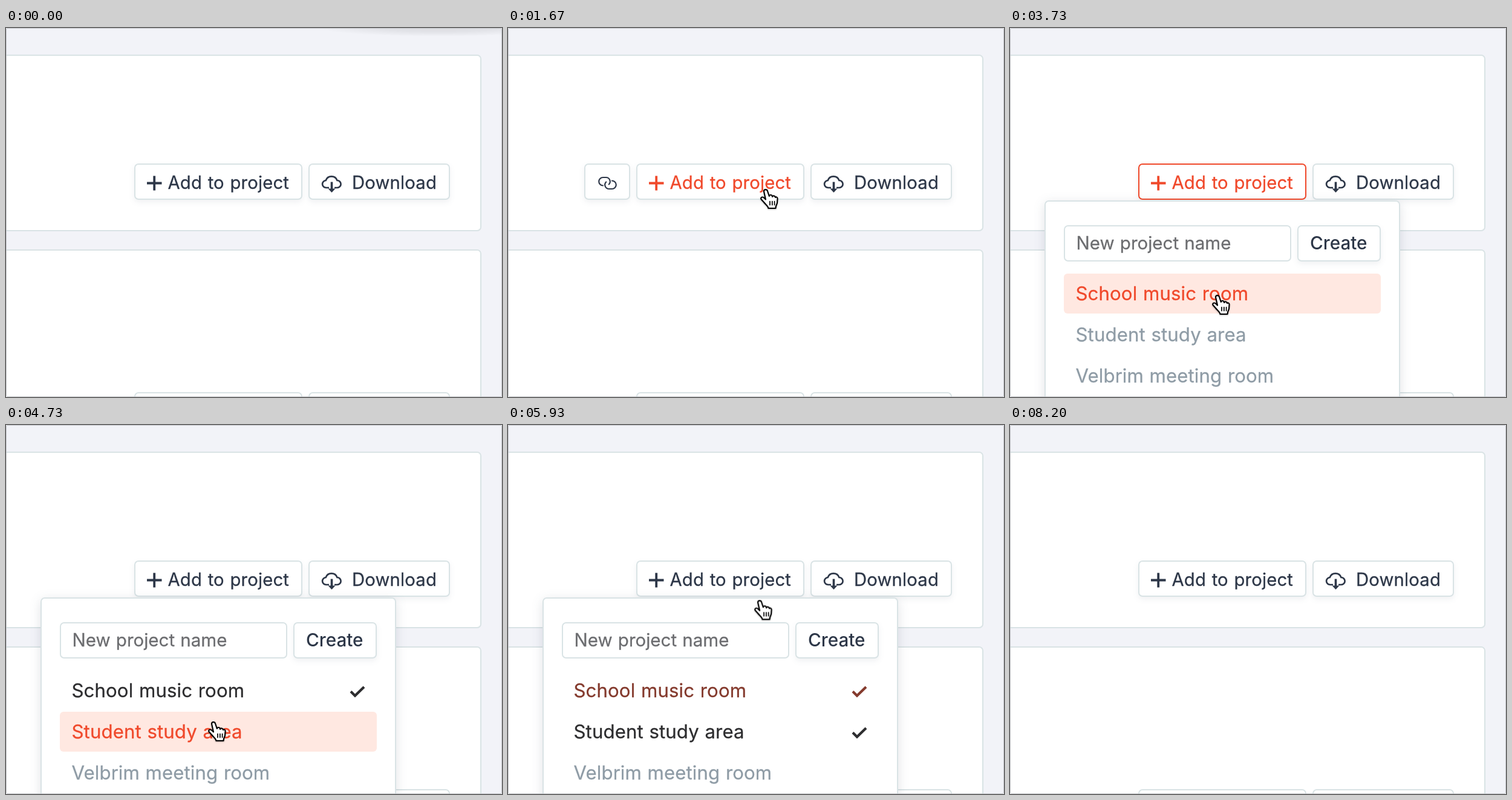
An HTML page that plays this animation: 820x610 px, repeating every 8990 ms.

```html
<!DOCTYPE html>
<html lang="en">
<head>
<meta charset="utf-8">
<title>Add to project</title>
<style>
:root {
  --ink: #2d3748;
  --red: #f0492b;
  --done: #2d2d2f;
  --muted: #8f9ca6;
  --line: #d9e3e5;
}
html, body { margin: 0; width: 820px; height: 610px; overflow: hidden; background: #f2f3f8; }
svg { display: block; }
text {
  font: 400 29.25px Inter, "Noto Sans", sans-serif;
  font-optical-sizing: none;
  letter-spacing: .18px;
  word-spacing: 1.2px;
  fill: currentColor;
  stroke: currentColor;
  stroke-width: .3;
}
.field { font-size: 29.5px; letter-spacing: 0; word-spacing: 1px; color: #6c6d70; }
.create { font-size: 29.7px; font-weight: 500; letter-spacing: 0; stroke: none; }
.row text { font-size: 31.2px; letter-spacing: .1px; word-spacing: .8px; }
.tip text { letter-spacing: .05px; }
.box { fill: #fff; stroke: var(--line); stroke-width: 2; }
.raised { filter: drop-shadow(0 4px 5px rgba(40, 60, 80, .07)); }
.icon { fill: none; stroke: currentColor; }
.ink { color: var(--ink); }
.muted { color: var(--muted); }
.hot { fill: #ffe8e1; }

/* every part shares one loop; .step parts switch without easing */
.anim { animation: 8990ms linear infinite both; }
.step { animation-timing-function: step-end; }

.haze { animation-name: haze; }
@keyframes haze { 0%, .7% { opacity: 1 } 3%, 100% { opacity: 0 } }

.link { animation-name: link; }
@keyframes link { 0% { opacity: 0 } 13.8% { opacity: 1 } 29.7%, 100% { opacity: 0 } }

.add { animation-name: add; }
@keyframes add {
  0%, 15.7% { color: var(--ink) }
  17%, 44.8% { color: var(--red) }
  46.3%, 66% { color: var(--ink) }
  67.2%, 74.8% { color: var(--red) }
  80%, 100% { color: var(--ink) }
}
.add-box { animation-name: add-box; }
@keyframes add-box {
  0%, 29.4% { stroke: var(--line) }
  30.4%, 44.8% { stroke: var(--red) }
  46.3%, 66.6% { stroke: var(--line) }
  67.4%, 74.8% { stroke: var(--red) }
  80%, 100% { stroke: var(--line) }
}
.download { animation-name: download; }
@keyframes download {
  0%, 68.8% { color: var(--ink) }
  69.8%, 70.4% { color: var(--red) }
  71.34%, 100% { color: var(--ink) }
}

.popup { animation-name: popup; }
@keyframes popup {
  0%, 29.4% { opacity: 0 }
  31%, 66.7% { opacity: 1 }
  67.6%, 100% { opacity: 0 }
}
.row1 { animation-name: row1; }
@keyframes row1 {
  0%, 38% { color: var(--muted) }
  39.5%, 49.7% { color: var(--red) }
  51.4%, 60.2% { color: var(--done) }
  61.5%, 65.2% { color: var(--red) }
  66.6%, 100% { color: var(--done) }
}
.row2 { animation-name: row2; }
@keyframes row2 {
  0%, 49.7% { color: var(--muted) }
  51.4%, 60.2% { color: var(--red) }
  61.5%, 100% { color: var(--done) }
}
.hot1 { animation-name: hot1; }
@keyframes hot1 {
  0% { opacity: 0 } 38% { opacity: 1 } 49.7% { opacity: 0 }
  60.2% { opacity: 1 } 65.2%, 100% { opacity: 0 }
}
.hot2 { animation-name: hot2; }
@keyframes hot2 { 0% { opacity: 0 } 49.7% { opacity: 1 } 60.2%, 100% { opacity: 0 } }
.check1 { animation-name: check1; }
@keyframes check1 { 0% { opacity: 0 } 44.8%, 100% { opacity: 1 } }
.check2 { animation-name: check2; }
@keyframes check2 { 0% { opacity: 0 } 56.4%, 100% { opacity: 1 } }

.tip { animation-name: tip; }
@keyframes tip {
  0%, 69% { opacity: 0 }
  69.8%, 72.5% { opacity: 1 }
  74%, 100% { opacity: 0 }
}

.cursor { animation-name: cursor; }
@keyframes cursor {
  0% { transform: translate(470px, 625px) }
  10.3% { transform: translate(470px, 625px); animation-timing-function: cubic-bezier(.2, .7, .3, 1) }
  18%, 33.4% { transform: translate(417px, 266px); animation-timing-function: ease-in-out }
  40.2%, 48.2% { transform: translate(334px, 441px); animation-timing-function: ease-in-out }
  52%, 58.6% { transform: translate(334px, 490px); animation-timing-function: ease-in-out }
  60.6%, 64.5% { transform: translate(348px, 452px); animation-timing-function: ease-in-out }
  66.5%, 67.2% { transform: translate(417px, 262px); animation-timing-function: ease-in-out }
  69%, 100% { transform: translate(590px, 262px) }
}
.arrow { animation-name: arrow; }
@keyframes arrow { 0% { opacity: 1 } 15.7%, 100% { opacity: 0 } }
.hand { animation-name: hand; }
@keyframes hand { 0% { opacity: 0 } 15.7% { opacity: 1 } 70.4%, 100% { opacity: 0 } }
</style>
</head>
<body>
<svg width="820" height="610" viewBox="0 0 820 610">
  <defs>
    <radialGradient id="haze">
      <stop offset="0" stop-opacity=".09"/>
      <stop offset=".5" stop-opacity=".06"/>
      <stop offset="1" stop-opacity="0"/>
    </radialGradient>
    <path id="check" class="icon" stroke-width="4.2" d="M570 440.5l7 7 15-14.5"/>
    <path id="loop" d="M157 260.5a6.75 6.75 0 0 1 0-13.5h5a6.75 6.75 0 0 1 4.8 11.5"/>
  </defs>

  <ellipse class="haze anim" cx="715" cy="0" rx="195" ry="14" fill="url(#haze)"/>

  <!-- cards -->
  <rect class="box" x="-20" y="45" width="805" height="290" rx="6"/>
  <rect class="box" x="-20" y="367" width="805" height="290" rx="6"/>
  <rect class="box" x="213" y="603" width="276" height="58" rx="6"/>
  <rect class="box" x="501" y="603" width="232" height="58" rx="6"/>

  <!-- buttons -->
  <g class="link anim step ink">
    <rect class="box raised" x="127" y="225" width="74" height="58" rx="6"/>
    <g class="icon" stroke-width="2.2" stroke-linecap="round">
      <use href="#loop"/>
      <use href="#loop" transform="rotate(180 164.5 256.5)"/>
    </g>
  </g>
  <g class="add anim">
    <g class="raised"><rect class="box add-box anim" x="213" y="225" width="276" height="58" rx="6"/></g>
    <path class="icon" stroke-width="3.8" d="M233 256.5h24.5M245.2 244.5v24"/>
    <text x="267.5" y="266">Add to project</text>
  </g>
  <g class="download anim">
    <rect class="box raised" x="501" y="225" width="232" height="58" rx="6"/>
    <path class="icon" stroke-width="2.7" d="M534 264h-4.5a6 6 0 0 1-.8-12a10 10 0 0 1 18.8 0a6 6 0 0 1 .2 12H543"/>
    <path class="icon" stroke-width="3.6" d="M538.5 254.5v12"/>
    <path fill="currentColor" d="M532.5 265.5h12l-6 6.5z"/>
    <text x="572" y="266">Download</text>
  </g>

  <!-- project list -->
  <g class="popup anim">
    <rect class="box" x="58" y="286" width="586" height="400" rx="6"
      style="filter: drop-shadow(0 4px 9px rgba(40, 60, 80, .14))"/>
    <rect class="box" x="90" y="327" width="374" height="58" rx="6"/>
    <text class="field" x="109.5" y="366">New project name</text>
    <rect class="box raised" x="476" y="327" width="136" height="58" rx="6"/>
    <text class="create ink" x="496" y="366">Create</text>

    <g class="row row1 anim">
      <rect class="hot hot1 anim step" x="89" y="406" width="524" height="66" rx="6"/>
      <text x="108.5" y="450">School music room</text>
      <g class="check1 anim step"><use href="#check"/></g>
    </g>
    <g class="row row2 anim">
      <rect class="hot hot2 anim step" x="89" y="474" width="524" height="66" rx="6"/>
      <text x="108.5" y="518">Student study area</text>
      <g class="check2 anim step"><use href="#check" y="68"/></g>
    </g>
    <g class="row muted"><text x="108.5" y="586">Velbrim meeting room</text></g>
  </g>

  <!-- tooltip -->
  <g class="tip anim">
    <path fill="#3b434e" d="M427 140h371a6 6 0 0 1 6 6v56a6 6 0 0 1-6 6H623l-11 10-11-10H427a6 6 0 0 1-6-6v-56a6 6 0 0 1 6-6z"/>
    <text x="450.5" y="186" color="#fff">Assessment illustration</text>
  </g>

  <rect x=".5" y=".5" width="819" height="609" rx="2" fill="none" stroke="#c2c4c8"/>

  <!-- pointer -->
  <g class="cursor anim">
    <g style="filter: drop-shadow(0 1px 1px rgba(0, 0, 0, .3))">
      <path class="arrow anim step" stroke="#fff" stroke-width="2" d="M8 1v27l6-6 4 9 5-2-4-9h9z"/>
      <g class="hand anim step" stroke="#000" stroke-linejoin="round" stroke-linecap="round">
        <path fill="#fff" stroke-width="2.1" d="M6 4C6 .5 11 0 12 3.5L14.8 12C15.5 9 20 9.5 20 13C21 10.5 24.5 11 25 14C26.5 12.5 28.8 14 28.5 16.5L28 23C27.5 26 25.5 27 25.5 32H13.5C13 28 9 26 6 22L1.5 17C0 14 4 12 6.5 15L9 17.5Z"/>
        <path fill="none" stroke-width="1.7" d="M16 20.5v6M19.8 20.5v6M23.6 20.5v6"/>
      </g>
    </g>
  </g>
</svg>
</body>
</html>
```
